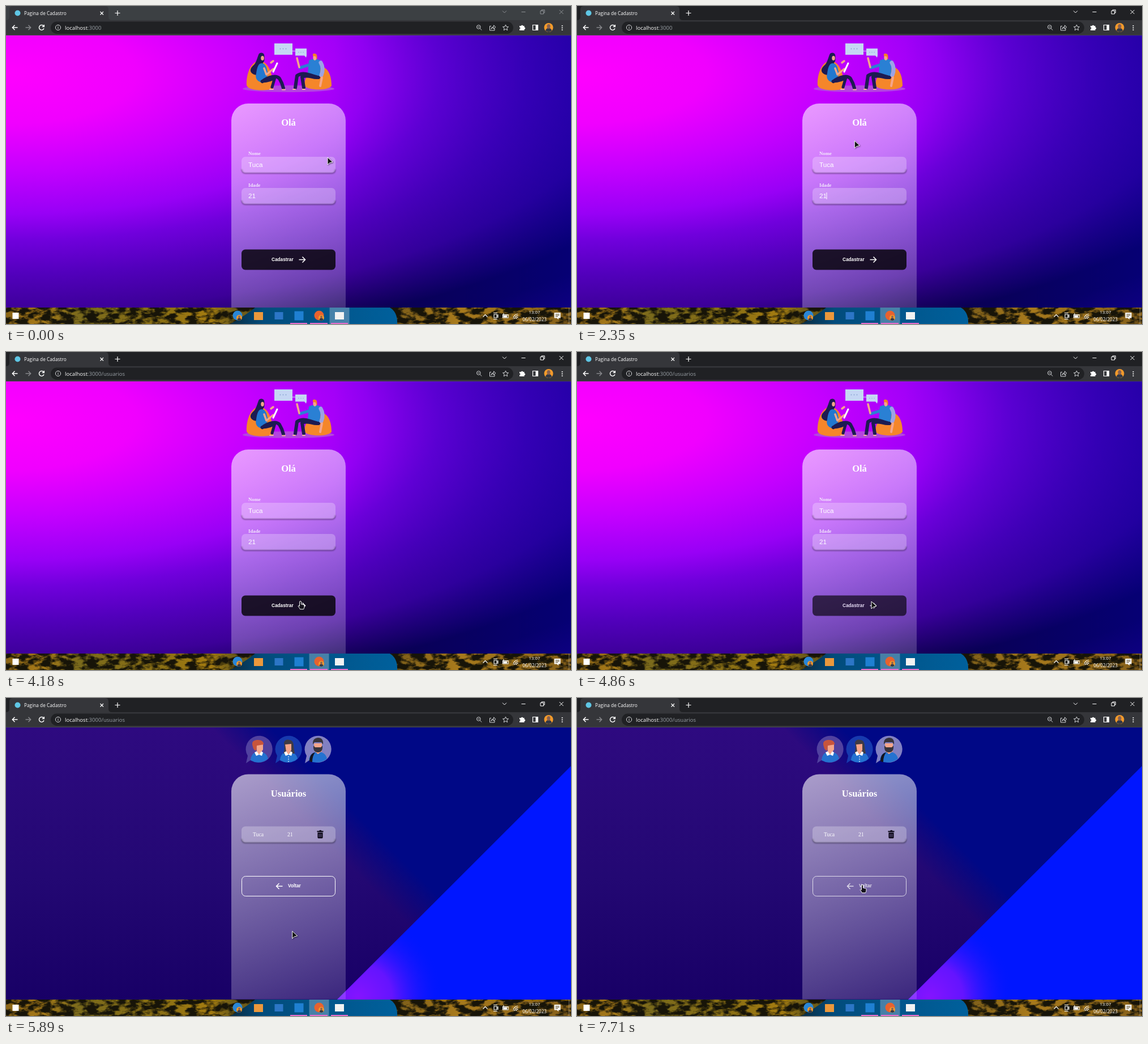
An HTML page for the animation above (8000 ms loop, 998 px wide and 561 px high).

```html
<!DOCTYPE html>
<html lang="pt">
<head>
<meta charset="utf-8">
<title>Pagina de Cadastro</title>
<style>
  html, body { margin: 0; height: 100%; overflow: hidden; background: #000; }
  svg { display: block; width: 100vw; height: 100vh; }
  text { fill: #fff; }
  .ui { font-family: "Open Sans", sans-serif; }
  .title { font: bold 16.54px "Liberation Serif", serif; text-anchor: middle; }
  .label { font: bold 8.76px "Liberation Serif", serif; fill: #f3e9fb; }
  .cell { font: 9.73px "Liberation Serif", serif; }
  .input { font: 11.68px "Liberation Sans", sans-serif; }
  .button { font: bold 8.27px "Liberation Sans", sans-serif; }
  .line { fill: none; stroke: #fff; stroke-width: 1.2; }
  .limb { fill: none; stroke-linecap: round; stroke-linejoin: round; }
</style>
</head>
<body>
<svg viewBox="0 0 998 561" preserveAspectRatio="none">
  <defs>
    <radialGradient id="sky" gradientUnits="userSpaceOnUse" cx="0" cy="0" r="1"
      gradientTransform="translate(0 120) scale(1536 588)">
      <stop offset="0" stop-color="#f0f"/>
      <stop offset=".15" stop-color="#f000ff"/>
      <stop offset=".29" stop-color="#c400ff"/>
      <stop offset=".42" stop-color="#9800f6"/>
      <stop offset=".5" stop-color="#7000dc"/>
      <stop offset=".6" stop-color="#5200bc"/>
      <stop offset=".71" stop-color="#3c0098"/>
      <stop offset=".83" stop-color="#0a0048"/>
      <stop offset=".88" stop-color="#0a0048"/>
      <stop offset="1" stop-color="#20006c"/>
    </radialGradient>
    <linearGradient id="cool">
      <stop offset=".58" stop-color="#00a" stop-opacity="0"/>
      <stop offset="1" stop-color="#00a" stop-opacity=".45"/>
    </linearGradient>
    <linearGradient id="dusk" x2="0" y2="1">
      <stop offset="0" stop-color="#2e0a80"/>
      <stop offset=".55" stop-color="#230873"/>
      <stop offset="1" stop-color="#180066"/>
    </linearGradient>
    <linearGradient id="ridge" gradientUnits="userSpaceOnUse" x1="548" y1="238" x2="600" y2="186">
      <stop offset="0" stop-color="#00067e" stop-opacity="0"/>
      <stop offset="1" stop-color="#000886"/>
    </linearGradient>
    <radialGradient id="violet" gradientUnits="userSpaceOnUse" cx="622" cy="528" r="150">
      <stop offset="0" stop-color="#8414ff"/>
      <stop offset=".4" stop-color="#6414ff"/>
      <stop offset="1" stop-color="#0016ff" stop-opacity="0"/>
    </radialGradient>
    <linearGradient id="glass" gradientUnits="userSpaceOnUse" x1="15.8" y1="-6.5" x2="186.2" y2="403.5">
      <stop offset="0" stop-color="#fff" stop-opacity=".6"/>
      <stop offset="1" stop-color="#fff" stop-opacity=".15"/>
    </linearGradient>
    <linearGradient id="hills">
      <stop offset="0" stop-color="#8a6415"/>
      <stop offset=".06" stop-color="#a87a18"/>
      <stop offset=".13" stop-color="#7a6a1c"/>
      <stop offset=".28" stop-color="#8c7014"/>
      <stop offset=".36" stop-color="#a57c10"/>
      <stop offset=".4" stop-color="#6e5c18"/>
      <stop offset=".7" stop-color="#80601a"/>
      <stop offset=".8" stop-color="#a87a1c"/>
      <stop offset="1" stop-color="#86601a"/>
    </linearGradient>
    <linearGradient id="lake">
      <stop offset="0" stop-color="#0a2c42"/>
      <stop offset=".2" stop-color="#024c7c"/>
      <stop offset="1" stop-color="#00609c"/>
    </linearGradient>
    <filter id="foliage" x="0" y="0" width="1" height="1" color-interpolation-filters="sRGB">
      <feTurbulence type="fractalNoise" baseFrequency=".05 .1" numOctaves="4" seed="4"/>
      <feColorMatrix values="0 0 0 0 .09  0 0 0 0 .08  0 0 0 0 .03  5 0 0 0 -1.9"/>
    </filter>
    <filter id="soft" x="-.1" y="-2" width="1.2" height="5"><feGaussianBlur stdDeviation=".9"/></filter>
    <path id="card" d="M0 397V30A30 30 0 0 1 30 0H172A30 30 0 0 1 202 30V397Z" fill="url(#glass)"/>
    <g id="field">
      <path d="M.5 22Q1 29 7 29H159Q165.500 29 165.500 22" fill="none" stroke="#000" stroke-opacity=".4" stroke-width="2" filter="url(#soft)"/>
      <rect width="166" height="28.200" rx="6.800" fill="#fff" fill-opacity=".25"/>
    </g>
    <path id="forward" d="M0 0H11M6-5 11 0 6 5" fill="none" stroke="#fff" stroke-width="1.500"/>
    <g id="person">
      <circle r="8" fill="#f39a2b"/>
      <path d="M-5.500 5.800Q-5 1 0 1T5.500 5.800Q0 10-5.500 5.800Z" fill="#333845"/>
      <ellipse cy="-2" rx="3" ry="4" fill="#8a6250"/>
    </g>
    <g id="dots" fill="#8fa6d4"><circle r="1"/><circle cx="5" r="1"/><circle cx="10" r="1"/></g>
    <path id="balloon" d="M-21-10A23.500 23.500 0 1 1-14 19L-23 25-20 12A23 23 0 0 1-21-10Z"/>
  </defs>

  <g id="signup">
    <rect y="51" width="998" height="481" fill="url(#sky)"/>
    <rect y="51" width="998" height="481" fill="url(#cool)"/>

    <ellipse cx="499" cy="146" rx="81" ry="6" fill="#b445e0"/>
    <g fill="#c5d6f4">
      <path d="M474 66H506V86H474ZM511 75H531V87.500L530 91 527 87.500H511Z"/>
      <path d="M506 79.500H511" stroke="#c5d6f4"/>
    </g>
    <use href="#dots" x="484.500" y="75.500"/>
    <use href="#dots" transform="translate(517 81.500) scale(.8)"/>

    <path d="M425 140C424 118 434 96 448 97 466 98 472 125 472 146 460 150 428 150 425 140Z" fill="#f5862a"/>
    <path d="M446 86c2-5 9-4 10 0 1 6 1 12-2 14-2 8 0 16-6 21-6 2-14 0-16-6-1-7 6-10 8-14 3-5 4-10 6-15Z" fill="#1d1b52"/>
    <ellipse cx="453" cy="92" rx="2.800" ry="4" fill="#f5a58a"/>
    <path d="M448 102c6-3 10 1 12 6l3 12-8 15c-9 0-16-6-13-16 1-7 2-13 6-17Z" fill="#2278cf"/>
    <g class="limb">
      <path d="M453 133C464 124 478 122 483 128Q488 136 490 145" stroke="#1d1b52" stroke-width="6"/>
      <path d="M452 133Q468 132 475 126L470 143" stroke="#1d1b52" stroke-width="5"/>
      <path d="M456 110 460 121 472 111M468 100 472 97" stroke="#f5a58a" stroke-width="3.500"/>
      <path d="M472 116 479 101" stroke="#fff" stroke-width="3"/>
      <path d="M466 147H472M488 147.500H493" stroke="#f5b79c" stroke-width="2"/>
    </g>

    <path d="M527 140c0-16 12-31 30-33 14 2 18 20 18 34-6 9-44 8-48-1Z" fill="#f5862a"/>
    <path d="M535 96c8-4 16-3 22 1l-3 28c-10 2-19 0-21-6Z" fill="#2a80d4"/>
    <g class="limb">
      <path d="M552 126C538 123 526 115 514 123L511 144" stroke="#1d1b52" stroke-width="6"/>
      <path d="M550 126C541 127 533 120 523 125L526 144" stroke="#1d1b52" stroke-width="6"/>
      <path d="M535 104 519 109" stroke="#2a80d4" stroke-width="5"/>
      <path d="M518 108 514 92" stroke="#f5a58a" stroke-width="3.500"/>
      <path d="M556 100Q562 110 557 122" stroke="#9ca3e6" stroke-width="7"/>
      <path d="M558 126 555 141" stroke="#f5a58a" stroke-width="4"/>
      <path d="M507 147H511M524 147H528" stroke="#f5b79c" stroke-width="2"/>
    </g>
    <ellipse cx="545.500" cy="91" rx="3.200" ry="5" fill="#f5a58a"/>
    <path d="M542 88Q541 83 546 84 551 85 549 95L547 89Z" fill="#f58025"/>

    <use href="#card" x="398" y="172"/>
    <text class="title" x="499" y="211">Olá</text>
    <text class="label" x="428" y="263">Nome</text>
    <use href="#field" x="416" y="266"/>
    <text class="input" x="428" y="283.500">Tuca</text>
    <text class="label" x="428" y="318.500">Idade</text>
    <use href="#field" x="416" y="321"/>
    <text class="input" x="428" y="339">21</text>
    <path id="caret" d="M441 329V341" stroke="#fff"/>
    <g id="submit">
      <rect x="416" y="429.500" width="166" height="36" rx="6.800" fill="#000" fill-opacity=".8"/>
      <text class="button" x="469" y="450">Cadastrar</text>
      <use href="#forward" x="517.500" y="447.500"/>
    </g>
  </g>

  <g id="users">
    <rect y="51" width="998" height="481" fill="url(#dusk)"/>
    <rect y="51" width="998" height="481" fill="url(#ridge)"/>
    <path id="corner" d="M998 120V532H585Z" fill="#0016ff"/>
    <path d="M998 120V532H585Z" fill="url(#violet)"/>

    <g id="avatars">
      <g transform="translate(447 90)">
        <use href="#balloon" fill="#51419f"/>
        <path d="M-15 20Q-14 6-2 5 13 4 16 17 6 26-8 23Z" fill="#2472d0"/>
        <path d="M-5-8H7V1L4 5 0 10-4 5Z" fill="#f5a58a"/>
        <path d="M-11-4Q-15-15-4-16 8-17 8-8L-4-6-5 3Q-10 2-11-4Z" fill="#c8553c"/>
        <path d="M-4 4 0 10-5 12-8 6ZM4 4 0 10 5 12 7 6Z" fill="#fff"/>
      </g>
      <g transform="translate(499 90)">
        <use href="#balloon" fill="#173aae"/>
        <path d="M-15 20Q-14 6-2 5 13 4 16 17 6 26-8 23Z" fill="#2472d0"/>
        <path d="M-8-11Q-6-18 2-16 9-15 9-5L11 8H-9Q-6 0-8-11Z" fill="#3e3b46"/>
        <path d="M-6-8 5-9V2L3 5 0 10-4 5Z" fill="#f5a58a"/>
        <path d="M-4 4 0 10-5 12-8 6ZM4 4 0 10 5 12 7 6Z" fill="#fff"/>
        <path d="M0 13V23" stroke="#fff" stroke-width="1.500" stroke-dasharray="1.500 2.500"/>
      </g>
      <g transform="translate(551 90)">
        <use href="#balloon" fill="#8180c2"/>
        <path d="M-16 19Q-14 6-2 5 13 4 16 17 6 26-10 23Z" fill="#2472d0"/>
        <path d="M-15 22Q-15 8-5 6-10 12-10 23Z" fill="#15131f"/>
        <path d="M-7-10H7V4L0 9-6 4Z" fill="#f5a58a"/>
        <path d="M-9-8Q-10-19 0-20 10-20 9-8L6-12H-6Z" fill="#38343c"/>
        <path d="M-8-6-5-3H5L8-6Q9 6 0 6-9 6-8-6Z" fill="#38343c"/>
      </g>
    </g>

    <g id="list">
      <use href="#card" x="398" y="134.500"/>
      <text class="title" x="499" y="173.500">Usuários</text>
      <use href="#field" x="416" y="226.500"/>
      <text class="cell" x="436" y="243.500">Tuca</text>
      <text class="cell" x="497" y="243.500">21</text>
      <g id="trash">
        <path d="M549.500 234.500H553L554 233.300H556.500L557.500 234.500H560.500V236.500H549.500ZM550.500 237.500H559.500V246Q559.500 247.500 558 247.500H552Q550.500 247.500 550.500 246Z"/>
        <path d="M552.800 239.500V245.500M555 239.500V245.500M557.200 239.500V245.500" stroke="#9a8fc4" stroke-width=".7"/>
      </g>
      <g id="back">
        <rect class="line" x="416.500" y="314.500" width="165" height="35" rx="6.800" style="stroke-width:1"/>
        <use href="#forward" transform="translate(488.500 332) scale(-1 1)"/>
        <text class="button" x="498" y="334">Voltar</text>
      </g>
    </g>
  </g>

  <g id="browser" class="ui">
    <rect id="strip" width="998" height="26"/>
    <path d="M0 25Q6 25 6 19V6Q6 0 12 0H175Q181 0 181 6V19Q181 25 187 25H998V51.500H0Z" fill="#35363a"/>
    <path d="M0 51.500H998" stroke="#48494d" stroke-width=".8"/>
    <circle cx="20.500" cy="12.500" r="5" fill="#5fc6e4"/>
    <text x="32" y="15.500" font-size="8.300">Pagina de Cadastro</text>
    <path class="line" d="M166.500 10 172 15.500M172 10 166.500 15.500M192.500 12.500H201.500M197 8V17"/>
    <g id="controls" class="line" style="stroke-width:1">
      <path d="M877 8.500 880.500 12 884 8.500M910.500 10.500H917.500M944 8.500H949.500V14H944ZM946 8.500V6.800H951.300V12H949.500M977.500 7 984.500 14M984.500 7 977.500 14"/>
    </g>
    <g class="line" style="stroke-width:1.500">
      <path d="M20.500 38H11.500M15.500 33.800 11.300 38 15.500 42.200"/>
      <path d="M34.500 38H43.500M39.500 33.800 43.700 38 39.500 42.200" stroke="#85868a"/>
      <path d="M66.500 35.500A4.400 4.400 0 1 0 67 39.500M67.300 33V36.500H63.800"/>
    </g>
    <rect x="79" y="27.500" width="817" height="21.500" rx="10.700" fill="#202124"/>
    <g class="line" style="stroke:#d5d7da;stroke-width:1">
      <circle cx="92" cy="38" r="4.600"/>
      <path d="M92 37.200V40.500M92 35.200V36.300"/>
      <circle cx="834.800" cy="37" r="3.300"/>
      <path d="M837.200 39.500 840.300 42.600M833.300 37H836.300"/>
      <path d="M857 35.500H854.500V43H863V40M857 40.500Q857.500 36.500 861.500 36.500V34L865 37.300 861.500 40.300V38.300Q858.500 38.300 857 40.500Z"/>
      <path d="M882.500 33 884 36.500 887.500 36.800 884.800 39.200 885.700 42.800 882.500 40.800 879.300 42.800 880.200 39.200 877.500 36.800 881 36.500Z"/>
    </g>
    <text x="104" y="41.500" font-size="9.550">localhost<tspan id="address" fill="#9aa0a6"></tspan></text>
    <path d="M907 35H910A1.700 1.700 0 0 1 913.200 35H915.500V37.500A1.700 1.700 0 0 1 915.500 41V43H907V40.500A1.500 1.500 0 0 0 907 37.500Z" fill="#fff"/>
    <path d="M930.500 33.500H939.500V42.500H930.500Z" class="line"/>
    <path d="M935.500 33.500H939.500V42.500H935.500Z" fill="#fff"/>
    <use href="#person" x="958.500" y="38"/>
    <path d="M982.500 34V43" stroke="#fff" stroke-width="1.800" stroke-dasharray="1.800 1.800"/>
  </g>

  <g id="taskbar" class="ui">
    <rect y="532" width="998" height="29" fill="url(#hills)"/>
    <rect y="532" width="998" height="29" filter="url(#foliage)"/>
    <path d="M396 561Q420 548 440 532H678Q692 540 691 561Z" fill="url(#lake)"/>
    <rect id="highlight" y="532" width="35" height="29" fill="#c8d0e0" fill-opacity=".35"/>
    <path d="M502 560H532M537 560H568M574 560H604" stroke="#e56ccb" stroke-width="2"/>
    <rect x="11.500" y="541" width="11" height="11" fill="#fff"/>
    <circle cx="409" cy="546" r="8.500" fill="#2a86d6"/>
    <use href="#person" transform="translate(412 550) scale(.62)"/>
    <rect x="438" y="540" width="16" height="14" fill="#eb983c"/>
    <rect x="474.500" y="540" width="15" height="13" fill="#2c76c6"/>
    <rect x="509.500" y="538.500" width="16" height="16" fill="#1f80d2"/>
    <circle cx="553" cy="546" r="8.500" fill="#e8622e"/>
    <use href="#person" transform="translate(557 550) scale(.62)"/>
    <rect x="581" y="540" width="16" height="13" fill="#f2f2f2"/>
    <g class="line" style="stroke-width:1.100">
      <path d="M842.500 548.500 846.500 544.500 850.500 548.500M862 544H867V550H862ZM867 546 869 545V549L867 548M861 541.500H868M861 552.500H868"/>
      <path d="M877.500 544.500H887V550H877.500ZM879 542V549"/>
      <path d="M896 551.500A8 8 0 0 1 904 543.500M898.500 552A6 6 0 0 1 904.500 546.200M901 552A3.500 3.500 0 0 1 904.500 549"/>
    </g>
    <path d="M879 545.500H885V549.500H879Z" fill="#fff"/>
    <text x="933.500" y="542.500" font-size="7.800" text-anchor="middle">13:07</text>
    <text x="933.500" y="555.500" font-size="8.050" text-anchor="middle">06/02/2023</text>
    <path d="M968.500 541H979.500V550.500H976V553L973 550.500H968.500Z" fill="#fff"/>
    <path d="M970.500 543.700H977.500M970.500 545.800H977.500M970.500 547.900H975" stroke="#4a3a14" stroke-width=".9"/>
    <path d="M994.500 532V561" stroke="#fff" stroke-opacity=".35"/>
  </g>

  <g id="cursor">
    <path id="arrow" d="M0 0V13L3.500 9.800 9 8.300Z" fill="#111" stroke="#fff" style="filter:drop-shadow(1px 1px 1px #0008)"/>
    <g id="beam" fill="none">
      <path d="M-2-5.500H3M.5-5.500V6.500M-2 6.500H3" stroke="#fff" stroke-opacity=".35" stroke-width="2.500"/>
      <path d="M-2-5.500H3M.5-5.500V6.500M-2 6.500H3" stroke="#2a2030" stroke-width="1.300"/>
    </g>
    <path id="hand" d="M-1.500 1A1.500 1.500 0 0 1 1.500 1V5L5.500 5.800Q7.300 6.300 7.200 8L6.600 11.500 5.600 13.800H-.5Q-1.500 11.500-4 8.300-3.500 6.500-1.500 8.300Z" fill="#14101c" stroke="#fff"/>
  </g>
</svg>
<script>
const LOOP = 8000;
const el = id => document.getElementById(id);
const show = (id, on) => { el(id).style.display = on ? '' : 'none'; };

// Pointer path: time, x, y
const path = [
  [1540, 568, 267], [1700, 562, 318], [1900, 520, 358], [2120, 457, 315], [2350, 490, 238],
  [2450, 515, 222], [2680, 551, 278], [2870, 553, 330], [3050, 542, 390], [3200, 526, 431],
  [3320, 522, 438], [3540, 522, 438], [3710, 520, 440], [5700, 520, 440], [6100, 490, 380],
  [6510, 449, 298], [6630, 449, 298], [6660, 452, 304], [6710, 466, 314], [6840, 466, 314],
  [6850, 486, 331], [7010, 486, 331], [7060, 496, 341], [7270, 496, 341], [7430, 504, 330]
];

function pointerAt(t) {
  const next = path.findIndex(p => p[0] > t);
  if (next < 0) return path[path.length - 1].slice(1);
  if (next === 0) return path[0].slice(1);
  const a = path[next - 1], b = path[next];
  const k = (t - a[0]) / (b[0] - a[0]);
  return [1, 2].map(i => a[i] + (b[i] - a[i]) * k);
}

function pointerKind(t, x, y) {
  const within = (top, bottom) => x > 416 && x < 582 && y > top && y < bottom;
  if (t < 80) return 'arrow';
  if (t >= 5350) return t >= 5750 && within(314, 350) ? 'hand' : 'arrow';
  if (within(429, 465)) return t < 4860 ? 'hand' : 'arrow';
  return within(266, 294) || within(321, 349) ? 'beam' : 'arrow';
}

function draw() {
  const t = performance.now() % LOOP;
  const focused = t >= 80, listed = t >= 5350, loaded = t >= 5750;

  show('signup', !listed);
  show('users', listed);
  show('caret', (focused && t < 680) || (t >= 1290 && t < 2450));
  show('avatars', loaded);
  el('list').setAttribute('transform', `translate(0 ${loaded ? 0 : -48.5})`);
  el('trash').setAttribute('fill', loaded ? '#05000f' : '#12005a');
  el('submit').setAttribute('opacity', t >= 4460 ? .8 : 1);
  el('back').setAttribute('opacity', t >= 7710 ? .75 : 1);

  el('strip').setAttribute('fill', focused ? '#202124' : '#3c4043');
  el('controls').style.stroke = focused ? '#fff' : '#8d9094';
  el('address').textContent = t >= 4180 ? ':3000/usuarios' : ':3000';
  el('highlight').setAttribute('x', focused ? 535.5 : 571.5);

  const [x, y] = pointerAt(t);
  const kind = pointerKind(t, x, y);
  el('cursor').setAttribute('transform', `translate(${x} ${y})`);
  ['arrow', 'beam', 'hand'].forEach(id => show(id, id === kind));
  requestAnimationFrame(draw);
}
draw();
</script>
</body>
</html>
```
